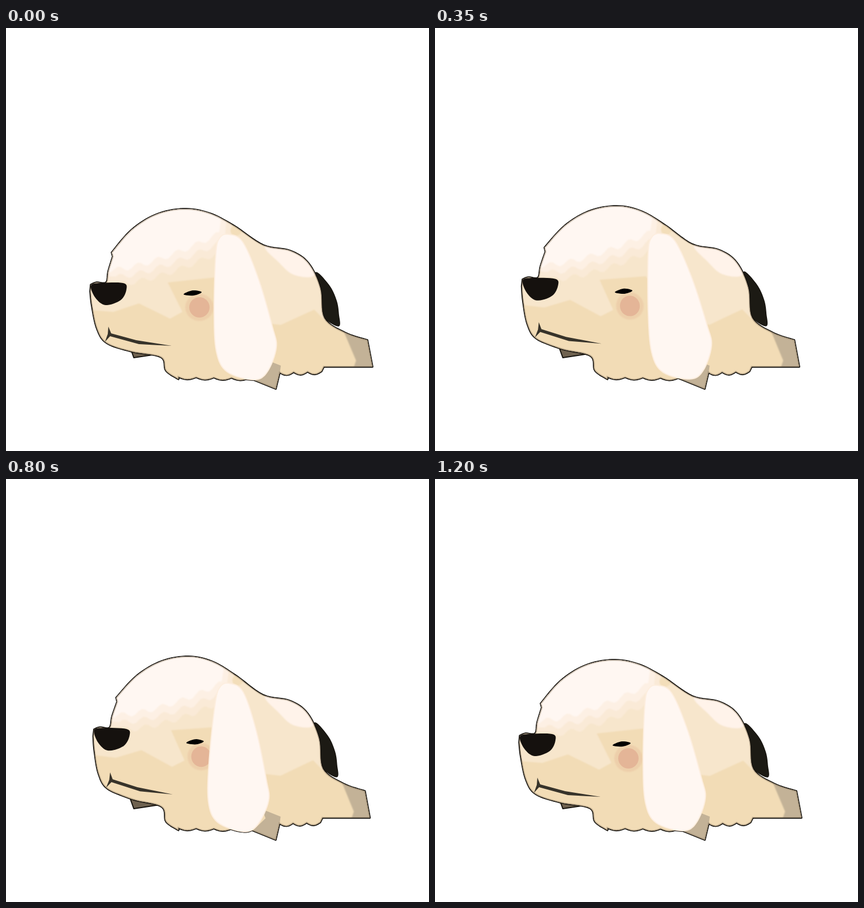
Animation, 748 px wide and 748 px high, one loop 1250 ms. Source, as an HTML page:

```html
<!DOCTYPE html>
<html lang="en">
<head>
<meta charset="utf-8">
<title>Resting puppy</title>
<style>
html, body { margin: 0; width: 100%; height: 100%; overflow: hidden; background: #fff; }
svg { display: block; width: 100%; height: 100%; }
</style>
</head>
<body>
<svg id="stage" viewBox="0 0 748 748">
  <defs>
    <clipPath id="skin"><path id="skinPath"/></clipPath>
    <filter id="soft" x="-20%" y="-20%" width="140%" height="140%"><feGaussianBlur stdDeviation="1.3"/></filter>
    <filter id="crisp" x="-20%" y="-20%" width="140%" height="140%"><feGaussianBlur stdDeviation="0.6"/></filter>
  </defs>
  <g id="back" stroke="#17140f" stroke-linejoin="round"></g>
  <g id="coat" clip-path="url(#skin)"></g>
  <g id="front"></g>
</svg>
<script>
const LOOP = 1250, CYCLE = 1200, STEP = 50;
const clamp = v => Math.max(0, Math.min(1, v));
const pts = s => s.split(' ').map(p => p.split(',').map(Number));
const $ = id => document.getElementById(id);

// Smooth line through a few key points.
function spline(s, closed) {
  const p = pts(s), n = p.length, out = [];
  const at = i => closed ? p[(i + n) % n] : p[Math.max(0, Math.min(n - 1, i))];
  for (let i = 0; i < (closed ? n : n - 1); i++) {
    const [a, b, c, d] = [-1, 0, 1, 2].map(k => at(i + k));
    for (let u = 0; u < 1; u += 1 / 8)
      out.push([0, 1].map(j => b[j] + u / 2 * (c[j] - a[j]
        + u * (2 * a[j] - 5 * b[j] + 4 * c[j] - d[j]
        + u * (3 * (b[j] - c[j]) + d[j] - a[j])))));
  }
  if (!closed) out.push(p[n - 1]);
  return out;
}
const blob = s => spline(s, true);

// Row of hanging tufts between two points.
function tufts([x0, y0], [x1, y1], count, drop) {
  return Array.from({ length: count * 6 + 1 }, (_, i) => {
    const u = i / (count * 6);
    return [x0 + (x1 - x0) * u, y0 + (y1 - y0) * u + drop * Math.abs(Math.sin(Math.PI * count * u))];
  });
}

function oval(cx, cy, rx, ry) {
  return Array.from({ length: 36 }, (_, i) => {
    const a = i * Math.PI / 18;
    return [cx + rx * Math.cos(a), cy + ry * Math.sin(a)];
  });
}

// Forehead fur with a ragged lower edge; each level reaches further down.
function fur(level) {
  const edge = [[150, 290], [150, 428 + 10 * level]];
  for (let x = 185; x <= 378; x += 6) {
    const u = (x - 185) / 193;
    edge.push([x + 9 * level, 428 + 12 * level - 65 * u ** 1.5 + 5 * Math.sin(x / 5.5 + level)]);
  }
  return [...edge, [380 + 10 * level, 340], [370 + 10 * level, 290]];
}

const body = [
  ...spline('150,454 160,450 177,450 181,430 189,404'),
  ...spline('187,397 222,357 265,330 313,320 358,327 402,349 455,384 503,394 535,416 556,460 563,513 600,539 639,552'),
  [648, 599], [562, 599],
  ...tufts([558, 607], [484, 609], 3, 5),
  [477, 638],
  ...tufts([430, 619], [305, 617], 4, 4),
  ...spline('305,621 283,606 274,582 222,572 178,557 161,532 152,492 149,466')
];
const ear = blob('394,365 419,379 447,445 471,528 478,565 462,608 438,622 391,608 372,572 368,500 371,400 378,371');

// Head nods about the neck, the back lifts a little, the rear draws in.
function bend([x, y], { lift }) {
  const dx = 0.05 * Math.max(0, 610 - y) * clamp((450 - x) / 150)
           - 0.035 * Math.max(0, x - 470);
  const dy = 0.054 * Math.min(0, x - 400) * clamp((600 - y) / 35)
           - 0.014 * Math.max(0, 560 - y);
  return [x + dx * lift, y + dy * lift];
}

// Ear hangs from the head and swings like a pendulum.
function dangle([x, y], { lift, swing }) {
  const s = (y - 330) / 240;
  return [x + 6 * lift * (1 - s) + swing * s,
          y - 4 * lift * clamp(1 - s) - swing / 240 * (x - 410)];
}

const fixed = p => p;
const path = p => 'M' + p.map(q => q[0].toFixed(2) + ' ' + q[1].toFixed(2)).join('L') + 'Z';

const parts = [{ el: $('skinPath'), shape: body, move: bend }];

function add(layer, shape, attrs, move = bend) {
  const el = document.createElementNS('http://www.w3.org/2000/svg', 'path');
  for (const k in attrs) el.setAttribute(k, attrs[k]);
  $(layer).append(el);
  parts.push({ el, shape, move });
}

const soft = fill => ({ fill, filter: 'url(#soft)' });
const crisp = fill => ({ fill, filter: 'url(#crisp)' });

add('back', pts('217,558 226,583 272,576 268,556'), { fill: '#6f6250', 'stroke-width': 2 }, fixed);
add('back', blob('547,433 571,455 584,482 588,506 588,527 562,511 556,485'), { fill: '#1c1a14', 'stroke-width': 1.5 });
add('back', body, { fill: 'none', 'stroke-width': 3.4 });
add('back', ear, { fill: 'none', 'stroke-width': 4 }, dangle);

add('coat', body, { fill: '#f7e6cc' });
add('coat', pts('140,498 190,502 235,487 290,514 312,502 286,450 370,441 440,520 486,525 512,513 545,498 562,515 660,560 660,650 140,650'), soft('#f2dcb6'));
['#fff7f2', '#fdf0e4', '#faead7'].map((c, i) => [c, i]).reverse()
  .forEach(([c, i]) => add('coat', fur(i), soft(c)));
add('coat', oval(407, 358, 10, 9), soft('#f3deba'));
add('coat', blob('458,386 503,382 548,412 543,439 508,436 483,415'), soft('#fff3ea'));
add('coat', pts('597,536 645,545 655,605 614,603 619,588'), soft('#c3b297'));
add('coat', pts('453,584 486,597 480,642 434,624 459,600'), crisp('#c3b297'));
add('coat', body, { fill: 'none', stroke: '#8d7c64', 'stroke-width': 3, opacity: 0.5, filter: 'url(#crisp)' });

add('front', oval(342, 494, 25, 24), { ...soft('#eccba7'), opacity: 0.75 });
add('front', oval(342, 494, 18, 18), crisp('#e4b597'));
add('front', blob('314,471 330,464 346,467 332,473'), crisp('#000'));
add('front', pts('181,528 186,540 230,552 293,562 235,559 184,545 175,555 180,541'), crisp('#37332a'));
add('front', blob('150,456 165,451 207,451 213,462 203,481 176,490 158,477'), crisp('#15110e'));
add('front', ear, { fill: '#fff7f2', stroke: '#fdeedf', 'stroke-width': 2, filter: 'url(#crisp)' }, dangle);

function render(ms) {
  const t = Math.floor((ms % LOOP) / STEP) * STEP;
  const w = 2 * Math.PI * t / CYCLE;
  const pose = {
    lift: (1 - Math.cos(w)) / 2,
    swing: 16 * Math.sin(w + 0.3 * Math.sin(w) + 0.1) - 1.6
  };
  for (const { el, shape, move } of parts)
    el.setAttribute('d', path(shape.map(p => move(p, pose))));
}

const start = performance.now();
function tick() {
  render(performance.now() - start);
  requestAnimationFrame(tick);
}
tick();
</script>
</body>
</html>
```
